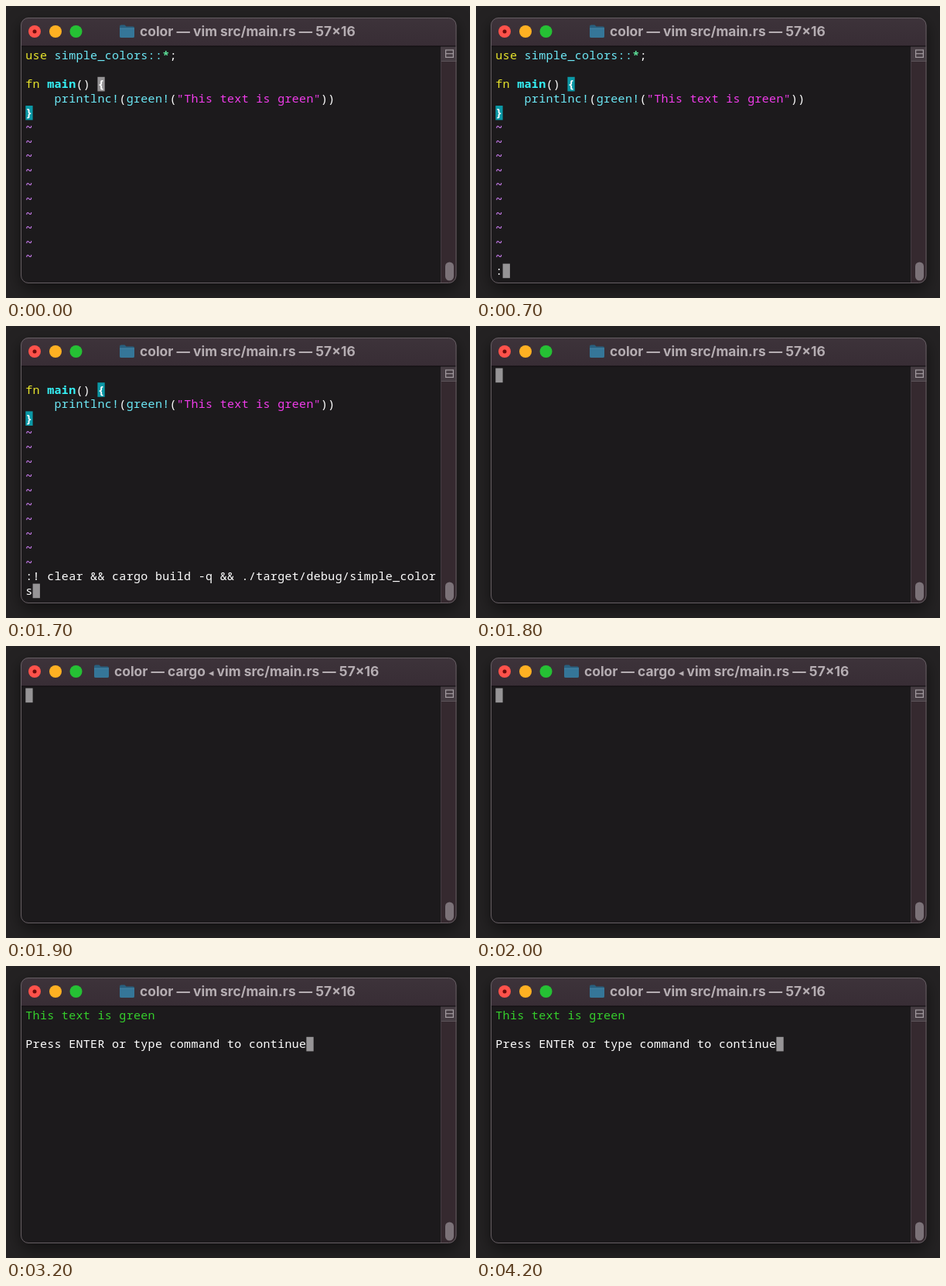
Write an HTML page that moves like this. It is 600x378 px and loops after 5100 ms.

```html
<!DOCTYPE html>
<html lang="en">
<head>
<meta charset="utf-8">
<title>Terminal</title>
<style>
  html, body { margin: 0; width: 100%; height: 100%; overflow: hidden; background: #242223; }
  svg { display: block; }
  .win { filter: drop-shadow(0 7px 10px rgba(0, 0, 0, .5)); }
  .title { font: 700 17.4px Inter, "Liberation Sans", sans-serif; fill: #b5adb2; }
  .arrow { font: 13px "DejaVu Sans", sans-serif; }
  .term text { font: 500 15px "Noto Sans Mono", "DejaVu Sans Mono", monospace; letter-spacing: .31px; white-space: pre; fill: #fff; }
  .term .b { font-weight: 700; }
  .term .yellow { fill: #e9e62c; }
  .term .cyan { fill: #6de9f7; }
  .term .name { fill: #35f0f5; font-weight: 700; }
  .term .mint { fill: #5ee39a; font-weight: 700; }
  .term .pink { fill: #f03cea; }
  .term .green { fill: #35cf2c; }
  .term .tilde { fill: #cb7df0; font-weight: 600; }
</style>
</head>
<body>
<svg width="600" height="378" viewBox="0 0 600 378">
  <defs>
    <linearGradient id="bar" x2="0" y2="1">
      <stop offset="0" stop-color="#3d333a"/>
      <stop offset="1" stop-color="#382d35"/>
    </linearGradient>
    <clipPath id="frame"><rect x="19" y="15" width="563.5" height="344" rx="10"/></clipPath>
  </defs>
  <rect width="600" height="378" fill="#242223"/>
  <rect class="win" x="19" y="15" width="563.5" height="344" rx="10" fill="#1c1a1c"/>
  <g clip-path="url(#frame)">
    <rect x="19" y="15" width="564" height="37" fill="url(#bar)"/>
    <rect x="563" y="52" width="20" height="307" fill="#35292f"/>
    <rect x="562" y="52" width="1" height="307" fill="#453c43"/>
    <rect x="563" y="52" width="20" height="20" fill="#453c42"/>
    <rect x="563" y="71" width="20" height="1" fill="#5c5359"/>
    <rect x="19" y="51.5" width="564" height="1" fill="#0d0b0d"/>
  </g>
  <g fill="none" stroke="#a39ba0" stroke-width="1.2">
    <rect x="568.6" y="57" width="9.8" height="9.4"/>
    <path d="M569 61.7h9"/>
  </g>
  <rect x="568" y="331.5" width="11" height="24" rx="5.5" fill="#7b7278"/>
  <rect x="19.5" y="15.5" width="562.5" height="343" rx="9.5" fill="none" stroke="#665e63"/>
  <circle cx="37" cy="33" r="8" fill="#fd524b"/>
  <circle cx="37" cy="33" r="2.5" fill="#6d0d0b"/>
  <circle cx="64" cy="33" r="8" fill="#fdb022"/>
  <circle cx="90.5" cy="33" r="8" fill="#25c134"/>
  <g id="bar-vim"></g>
  <g id="bar-cargo"></g>
  <g class="term" id="term"></g>
</svg>
<script>
const LOOP = 5100;
const COL = 9.31, ROW = 18.6, LEFT = 25.3, TOP = 54.6;
const GREY = '#969496', TEAL = '#0b98a6';
const byId = id => document.getElementById(id);

const span = (cls, s) => `<tspan class="${cls}">${s}</tspan>`;
const line = (row, s) => `<text x="${LEFT}" y="${(TOP + 14.4 + row * ROW).toFixed(2)}">${s}</text>`;
const cell = (row, col, fill) =>
  `<rect x="${LEFT + col * COL}" y="${TOP + row * ROW}" width="${COL}" height="${ROW}" fill="${fill}"/>`;

function titleBar(x, label) {
  return `<g transform="translate(${x} 24)">
    <path d="M0 2.5q0-2 2-2h4.5l2 2H17q2 0 2 2V15q0 2-2 2H2q-2 0-2-2z" fill="#28607f"/>
    <path d="M0 5h19v10q0 2-2 2H2q-2 0-2-2z" fill="#357698"/>
    <path d="M0 5h19" stroke="#4c8cab" stroke-width=".8"/></g>
    <text class="title" x="${x + 26}" y="39">${label}</text>`;
}

// The editor contents, with the first source line on row `top`.
function editor(top, brace) {
  const rows = [
    span('yellow', 'use') + ' ' + span('cyan', 'simple_colors::') + span('mint', '*') + ';',
    '',
    span('yellow', 'fn') + ' ' + span('name', 'main') + '() ' + span('b', '{'),
    '    ' + span('cyan', 'printlnc!') + '(' + span('cyan', 'green!') + '(' +
      span('pink', '"This text is green"') + '))',
    span('b', '}'),
    ...Array(10).fill(span('tilde', '~'))
  ];
  return cell(top + 2, 10, brace) + cell(top + 4, 0, TEAL) +
    rows.map((s, i) => top + i < 0 ? '' : line(top + i, s)).join('');
}

const screens = {
  edit: editor(0, GREY),
  colon: editor(0, TEAL) + cell(15, 1, GREY) + line(15, ':'),
  command: editor(-1, TEAL) + cell(15, 1, GREY) +
    line(14, ':! clear &amp;&amp; cargo build -q &amp;&amp; ./target/debug/simple_color') + line(15, 's'),
  blank: cell(0, 0, GREY),
  output: line(0, span('green', 'This text is green')) +
    line(2, 'Press ENTER or type command to continue') + cell(2, 39, GREY)
};

// start time, screen, title
const steps = [
  [0, 'edit', 'vim'],
  [700, 'colon', 'vim'],
  [1100, 'command', 'vim'],
  [1800, 'blank', 'vim'],
  [1900, 'blank', 'cargo'],
  [2100, 'output', 'cargo'],
  [2200, 'output', 'vim']
];

const bars = { vim: byId('bar-vim'), cargo: byId('bar-cargo') };
bars.vim.innerHTML = titleBar(147, 'color — vim src/main.rs — 57×16');
bars.cargo.innerHTML = titleBar(114,
  'color — cargo <tspan class="arrow">◂</tspan> vim src/main.rs — 57×16');
byId('term').innerHTML = Object.entries(screens)
  .map(([id, body]) => `<g id="${id}">${body}</g>`).join('');

const show = (el, on) => { el.style.display = on ? '' : 'none'; };

function draw() {
  const t = performance.now() % LOOP;
  const [, screen, title] = steps.filter(s => s[0] <= t).pop();
  for (const id in screens) show(byId(id), id === screen);
  for (const id in bars) show(bars[id], id === title);
  requestAnimationFrame(draw);
}
draw();
</script>
</body>
</html>
```
